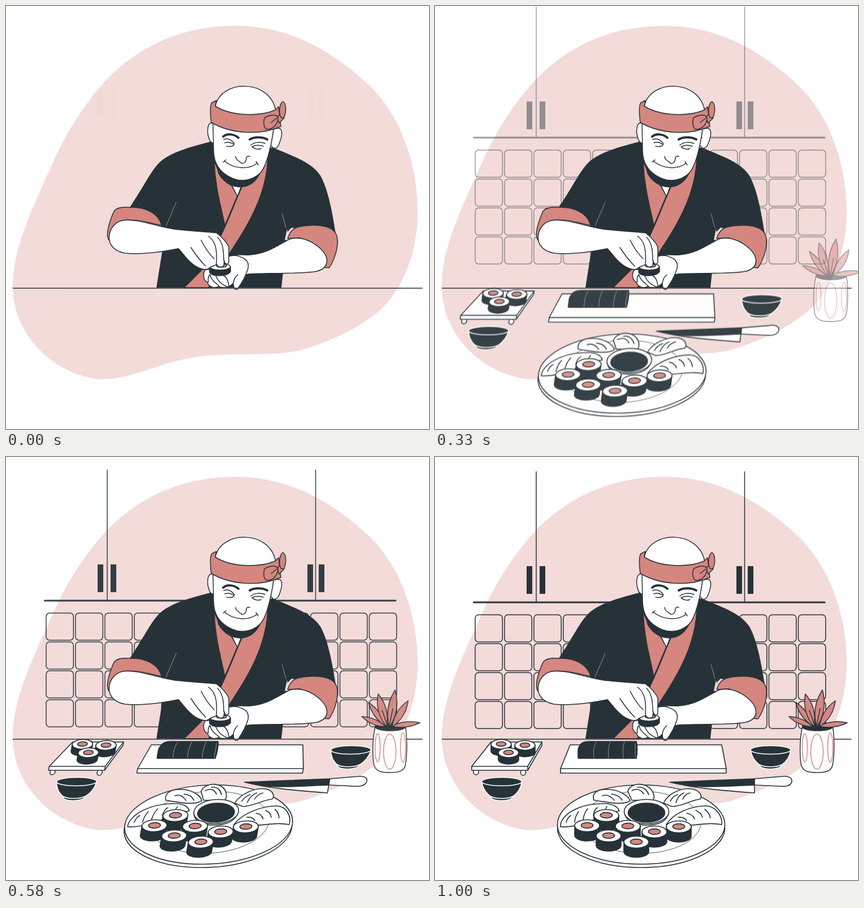
An HTML page for the animation above (1.04 s loop, 748 px wide and 748 px high).

```html
<!DOCTYPE html>
<html lang="en">
<head>
<meta charset="utf-8">
<title>Sushi chef</title>
<style>
  html, body { margin: 0; width: 100%; height: 100%; overflow: hidden; background: #fff; }
  svg { display: block; width: 748px; height: 748px; }
  .ink { fill: none; stroke: #263238; stroke-width: 1.5; stroke-linecap: round; stroke-linejoin: round; }
  #food { stroke-width: 1.65; }
  .white { fill: #fff; }
  .dark { fill: #263238; }
  .red { fill: #d5867f; }
  .pink { fill: #f2dbd9; }
  .bare { stroke: none; }
  .thin { stroke-width: .8; }
  .bold { stroke-width: 3; }
  .brow { stroke-width: 4; }
  .rose { stroke: #d5867f; }
  .edge { stroke: #fff; }
  .gray { stroke: #8d9396; stroke-width: 1; }
</style>
</head>
<body>
<svg viewBox="0 0 748 748">
  <path class="pink" d="M405 35C506 35 582 84 642 140C703 199 728 288 728 365C728 420 712 475 680 518C650 557 585 590 520 609C470 620 400 612 340 620C270 630 225 660 168 660C95 655 12 590 12 495C12 425 50 350 90 262C112 215 145 165 180 128C245 62 325 35 405 35Z"/>
  <g id="wall" class="ink"></g>
  <g id="chef" class="ink"></g>
  <g id="plant" class="ink"></g>
  <g id="food" class="ink"></g>
</svg>
<script>
const $ = id => document.getElementById(id);
const path = (d, cls = '') => `<path class="${cls}" d="${d}"/>`;
const oval = (x, y, rx, ry, cls = '') => `<ellipse class="${cls}" cx="${x}" cy="${y}" rx="${rx}" ry="${ry}"/>`;

// Cabinets and tiles
let wall = path('M179 26V257M547.5 26V257') + path('M68.5 257H689', 'bold');
for (const x of [162, 185, 533, 553])
  wall += path(`M${x} 193h10v49h-10Z`, 'dark bare');
for (let i = 0; i < 48; i++)
  wall += `<rect x="${71 + i % 12 * 51.95}" y="${279 + (i / 12 | 0) * 51.1}" width="48.3" height="48" rx="6"/>`;
$('wall').innerHTML = wall;

// Chef and table edge
$('chef').innerHTML = [
  path('M361 240C330 248 292 258 272 276C256 292 248 312 219 356L275 388L276 435L266 498H487L490 470L497 400L505 392L583 402C577 365 570 325 556 300C540 275 505 265 476 252L420 240Z', 'dark bare'),
  path('M497 394L499 412L493 414Z', 'pink bare'),
  path('M301 347L283 389M488 367L495 392', 'gray'),
  path('M398 314L409 337L418 314Z', 'white'),
  path('M368 274C370 320 379 350 387 388L409 336L399 318L380 302Z', 'red'),
  path('M463 266C462 330 430 385 400 430L358 498H315L358 455L382 402C396 372 407 342 418 318C437 312 450 290 463 266Z', 'red'),
  path('M374 286C384 303 400 309 415 309C432 309 446 300 453 286L449 296C440 314 428 320 413 320C396 319 384 310 376 296Z', 'dark'),
  // Ears, head and headband
  path('M367 207C355 203 354 225 361 239C364 243 368 243 369 240M476 217C493 212 488 232 482 246C478 254 470 252 470 247', 'white'),
  path('M370 178C379 129 468 128 477 186L472 225C468 250 463 275 453 291C441 308 417 312 401 305C380 296 367 280 367 255L366 205Z', 'white'),
  path('M363 206C361 190 361 175 364 171L372 167L370 177C400 196 450 195 476 184L482 178L486 213C450 229 400 227 363 206Z', 'red'),
  path('M479 197L485 191L492 198L483 207Z', 'red'),
  path('M486 197C481 186 485 170 490 169C497 174 495 191 491 198Z', 'red'),
  path('M457 198C466 192 478 191 481 197C481 211 470 219 461 218C455 215 455 205 457 198ZM469 206L479 198', 'red'),
  path('M384 231C391 225 403 226 411 233M431 236C439 231 453 231 462 236', 'brow'),
  path('M385 236C392 233 400 237 404 244M387 242C393 240 399 242 403 245M390 248C395 249 400 249 403 246'),
  path('M433 246C440 240 450 240 458 243M435 249C442 245 449 246 455 248M436 250C441 253 447 254 451 252'),
  path('M406 266C407 273 411 273 414 276C419 281 425 277 425 268C426 266 428 265 431 266M386 274C402 288 429 290 444 278M384 276L389 272M442 275L446 281'),
  // Right arm and lower hand
  path('M498 411C503 396 510 391 526 389C553 386 583 388 586 411C588 430 578 455 571 463L560 462L565 445L545 422L520 410Z', 'red'),
  path('M398 442C405 438 420 441 432 440C460 438 478 425 500 413C518 406 540 414 556 429C574 446 570 464 550 469C520 475 465 471 429 474L408 480Z', 'white'),
  path('M353 466C347 473 349 486 356 488C358 497 369 500 376 496C384 500 396 497 402 490C402 499 405 502 409 501C417 490 424 478 428 464C431 450 421 444 405 441L395 442L384 466Z', 'white'),
  path('M361 475C362 484 371 490 377 495M371 477C375 488 383 493 390 496M384 476C390 479 393 486 394 494M402 490C403 483 406 478 410 475M360 475C357 480 357 484 358 488'),
  // Roll being pressed
  path('M360 461V471C365 479 390 479 397 470V461Z', 'dark'),
  oval(378.5, 461, 18, 6, 'white'), oval(381, 459, 9, 3, 'red'),
  // Left arm and upper hand
  path('M182 414C176 405 182 384 190 365C194 356 206 355 220 356C245 355 270 366 275 388C250 382 225 376 207 379C190 385 184 400 182 414Z', 'red'),
  path('M207 379C230 375 270 391 300 395C330 398 352 399 372 401C380 407 389 416 394 426L394 453C392 459 386 456 386 450L385 459C382 463 375 462 373 457L361 462C355 468 347 466 341 463C325 456 315 440 305 429C270 436 235 440 210 437C189 433 178 419 184 399C188 389 196 381 207 379Z', 'white'),
  path('M327 427C336 441 344 451 353 460M345 414C352 428 360 439 368 447M358 407C370 415 374 430 372 457M374 409C384 418 385 435 385 450'),
  path('M12.5 499H736')
].join('');

// Potted plant: each leaf runs from a tip to its root
const leaf = (x, y, bx, by, w) => {
  const mx = (x + bx) / 2, my = (y + by) / 2, n = Math.hypot(x - bx, y - by);
  const dx = (y - by) / n * w, dy = (bx - x) / n * w;
  return path(`M${x} ${y}Q${mx + dx} ${my + dy} ${bx} ${by}Q${mx - dx} ${my - dy} ${x} ${y}`, 'red');
};
$('plant').innerHTML =
  path('M650 476C644 500 645 535 648 546C652 556 660 558 676 558C694 558 701 554 703 545C707 525 706 490 703 476Z', 'white') +
  oval(676.5, 477, 27, 7, 'dark') +
  [[626, 459, 668, 477, 9], [729, 470, 678, 476, 9], [638, 434, 668, 476, 10], [708, 431, 680, 477, 12],
   [655, 419, 670, 477, 14], [685, 412, 675, 478, 15]].map(a => leaf(...a)).join('') +
  path('M662 448L671 474M681 445L675 474') +
  oval(675.5, 521, 11, 31, 'rose') + oval(654, 514, 4.5, 25, 'rose') + oval(699, 514, 4.5, 26, 'rose');

// Dishes on the table
const roll = (x, y, r, h) =>
  path(`M${x - r} ${y}V${y + h}A${r} ${r / 2.2} 0 0 0 ${x + r} ${y + h}V${y}Z`, 'dark') +
  oval(x, y, r, r / 2.1, 'white') + oval(x, y - .5, r * .48, r * .22, 'red');
const bowl = (x, y) => `<g transform="translate(${x} ${y})">` +
  path('M-35.5 0C-33 16 -24 23 -19 27C-20 36 18 36 19 27C26 22 34 14 35.5 0Z', 'dark edge') +
  oval(0, 0, 35.5, 7.5, 'dark edge') + path('M-20 26C-10 31 10 31 20 26', 'edge') + '</g>';

$('food').innerHTML = [
  // Serving tray
  oval(72.5, 557, 4.5, 5, 'white'), oval(156, 558, 4.5, 5, 'white'),
  path('M99 504H189V510L164 554H65V547Z', 'white'), path('M65 547H164L189 504M164 547V554'),
  roll(117, 508, 18, 12), roll(159, 510, 18, 12), roll(130, 523, 18, 12),
  bowl(118, 574), bowl(593.5, 518),
  // Board with an uncut roll
  path('M239 509H507L515 551V559H222V551Z', 'white'), path('M222 551H515'),
  path('M253 532V517C256 506 262 503 272 503H356C358 511 358 524 356 533H254Z', 'dark'),
  path('M285 504C280 512 280 522 281 532M310 504C306 512 306 522 307 532M335 504C332 512 332 522 333 532M354 506V531', 'gray thin'),
  // Knife
  path('M415 575L565 569V594C510 590 460 586 415 575Z', 'white'),
  path('M415 575L565 569V581C530 582 480 586 450 582Z', 'dark bare'),
  path('M565 569L612 565C624 563 632 567 631 574C629 583 618 583 606 582L565 580Z', 'white'),
  // Plate
  oval(364.5, 656, 148, 70, 'white'), oval(364.5, 650, 148, 70, 'white'), oval(364.5, 646, 106, 55, 'thin'),
  path('M222 654C220 635 252 612 300 613C316 613 324 620 326 626C296 631 262 656 222 654Z', 'white'),
  path('M232 646Q234 638 240 634M247 646Q248 634 254 627M262 641Q264 628 270 622M280 634Q281 624 287 620M300 626L304 618'),
  path('M281 607C276 592 291 586 310 588C328 590 343 600 345 608C330 617 304 610 281 607Z', 'white'),
  path('M296 599C304 596 311 600 317 607M312 596C322 597 328 602 331 607'),
  path('M341 591C345 576 371 574 383 589C389 598 388 605 385 607H348Z', 'white'),
  path('M348 590C358 585 365 589 369 596M358 584C369 582 376 591 378 597'),
  path('M404 612C412 595 436 584 455 587C469 590 473 600 469 605C451 607 437 618 419 618Z', 'white'),
  path('M416 609Q420 600 429 597M426 611Q430 598 440 594M438 605Q442 596 451 594'),
  path('M409 650C421 630 452 617 480 617C497 618 509 636 507 650C478 644 447 657 409 650Z', 'white'),
  path('M430 637Q440 636 445 643M445 630Q455 631 459 640M461 625Q470 628 473 637M477 623Q485 629 487 638'),
  path('M335 627C336 645 354 651 374 651C394 651 412 645 413 627Z', 'white'),
  oval(374, 627, 39.5, 21.5, 'white'), oval(374, 629, 32.5, 17, 'dark'),
  ...[[303, 634], [269, 652], [341, 653], [431, 654], [388, 663], [307, 670], [356, 681]].map(([x, y]) => roll(x, y, 22, 17))
].join('');

// Cubic Bezier easing that overshoots before it settles
const ease = x => {
  const curve = (s, a, b) => 3 * s * (1 - s) ** 2 * a + 3 * s * s * (1 - s) * b + s ** 3;
  let lo = 0, hi = 1;
  for (let i = 0; i < 30; i++) {
    const mid = (lo + hi) / 2;
    if (curve(mid, .36, .5) < x) lo = mid; else hi = mid;
  }
  return curve(hi, -.01, 1.38);
};
const tan = deg => Math.tan(deg * Math.PI / 180);
const mix = (a, b, k) => a + (b - a) * k;
const place = (id, matrix, opacity) => {
  $(id).setAttribute('transform', `matrix(${matrix})`);
  $(id).setAttribute('opacity', Math.max(0, Math.min(1, opacity)));
};

function draw(time) {
  // 24 steps a second; the opening pose is held for two steps
  const step = Math.floor((time % 1040 + 5.5) / (1000 / 24));
  const u = Math.min(1, (step < 2 ? 0 : step) / 24 + .033);

  const slide = ease(u), gap = 45 * (1 - slide);
  place('wall', [1, 0, 0, 1, 0, -gap], slide);
  place('plant', [1, 0, 0, 1, gap, 0], slide);

  // Dash in from the left, lean past upright, then settle
  const dash = u < .6 ? ease(u / .6) : 1;
  const lean = u < .6 ? mix(tan(20), tan(-10), dash)
    : u < .8 ? mix(tan(-10), tan(2), ease((u - .6) / .2))
    : mix(tan(2), 0, ease((u - .8) / .2));
  place('food', [1, 0, lean, 1, mix(-374, 0, dash) - 614 * lean, 0], dash);
}

const start = performance.now();
function loop() {
  draw(performance.now() - start);
  requestAnimationFrame(loop);
}
loop();
</script>
</body>
</html>
```
